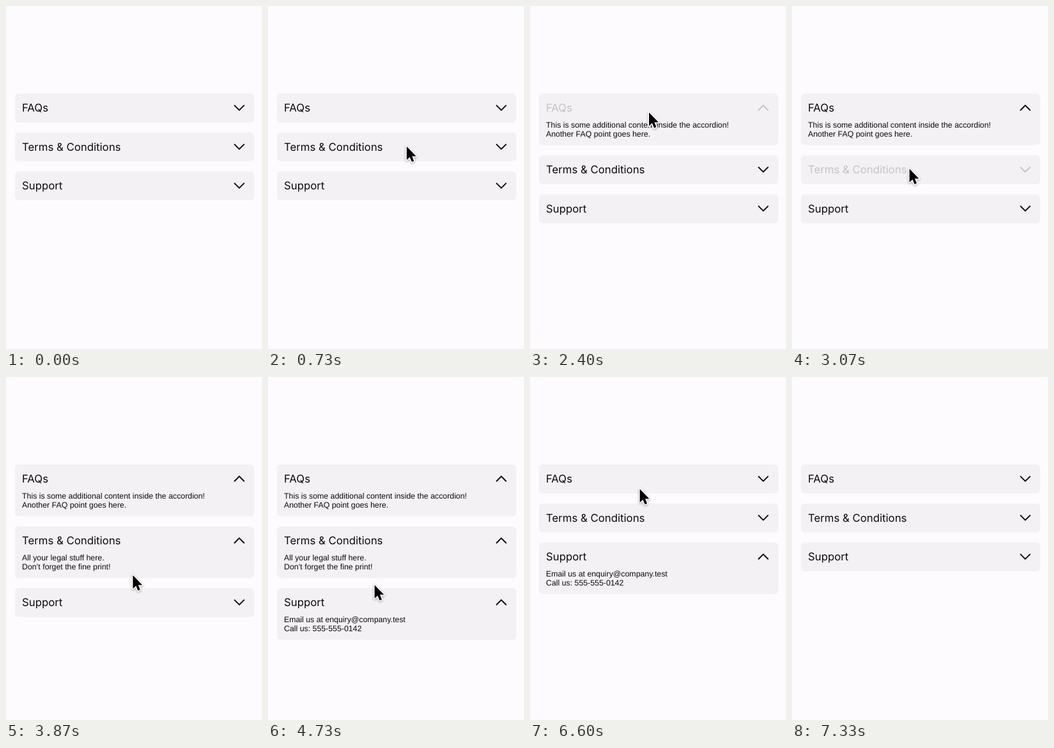
An HTML page that plays this animation: 400 by 533 pixels, repeating every 8070 ms.

```html
<!DOCTYPE html>
<html lang="en">
<head>
<meta charset="utf-8">
<title>Accordion</title>
<style>
  html, body { margin: 0; width: 100%; height: 100%; overflow: hidden; background: #fdfbfe; }
  svg { display: block; width: 100%; height: 100%; }
  text { text-rendering: geometricPrecision; fill: #0c0b0d; }
  .card { fill: #f3f1f4; }
  .title { font: 400 16.75px Inter, sans-serif; }
  .body { font: 400 12.33px "Liberation Sans", Arial, sans-serif; }
  .chevron { fill: none; stroke: #0c0b0d; stroke-width: 2; stroke-linecap: round; stroke-linejoin: round; }
  .cursor { fill: #000; stroke: #fff; stroke-width: 3.2; stroke-linejoin: round; paint-order: stroke;
            filter: drop-shadow(0 1.5px 1.5px rgba(0, 0, 0, .35)); }
</style>
</head>
<body>
<svg id="stage" viewBox="0 0 400 533"></svg>
<script>
const LOOP = 8070, STEP = 200 / 3, FADE = 250, DIM = 0.2, LEAD = 140;
const TOP = 136, CLOSED = 45, OPEN = 80.5, GAP = 15.5;
const SHOWN = 270, GONE = 7330, ENTRY = { x: 170, y: 432 };

const sections = [
  ["FAQs", "This is some additional content inside the accordion!", "Another FAQ point goes here."],
  ["Terms & Conditions", "All your legal stuff here.", "Don’t forget the fine print!"],
  ["Support", "Email us at enquiry@company.test", "Call us: 555-555-0142"]
];

// Each tap toggles a section; travel is the cursor's time on the way there.
const taps = [
  { section: 0, press: 1070, hold: 60, travel: 700 },
  { section: 0, press: 1730, hold: 140 },
  { section: 0, press: 2330, hold: 70 },
  { section: 1, press: 3070, hold: 130, travel: 330 },
  { section: 2, press: 4130, hold: 140, travel: 290 },
  { section: 1, press: 5270, hold: 200, travel: 560 },
  { section: 0, press: 6070, hold: 130, travel: 460 },
  { section: 2, press: 7070, hold: 10, travel: 400 }
];

const stage = document.getElementById("stage");
const ease = v => { const u = Math.min(1, Math.max(0, v)); return u * u * (3 - 2 * u); };

function add(parent, tag, attrs = {}, text = "") {
  const node = document.createElementNS("http://www.w3.org/2000/svg", tag);
  for (const key in attrs) node.setAttribute(key, attrs[key]);
  node.textContent = text;
  return parent.appendChild(node);
}

const cards = sections.map(([title, ...lines]) => {
  const root = add(stage, "g");
  const box = add(root, "rect", { class: "card", x: 14, width: 374, rx: 6 });
  const head = add(root, "g");
  add(head, "text", { class: "title", x: 25, y: 28.2 }, title);
  const chevron = add(head, "path", { class: "chevron" });
  const body = add(root, "g");
  lines.forEach((line, i) => add(body, "text", { class: "body", x: 25, y: 52.6 + 14 * i }, line));
  return { root, box, head, chevron, body };
});

const cursor = add(stage, "path", {
  class: "cursor",
  d: "M0 0V21L4.8 16.5L8 24L11.4 22.6L8.3 15.2H14.8Z"
});

function layout(t) {
  let y = TOP;
  return sections.map((_, i) => {
    const state = { y, open: false, opacity: 1 };
    for (const { section, press, hold } of taps) {
      if (section !== i || t < press) continue;
      const since = t - press - hold;
      if (since >= 0) state.open = !state.open;
      state.opacity = DIM + (1 - DIM) * ease(since / FADE);
    }
    state.height = state.open ? OPEN : CLOSED;
    y += state.height + GAP;
    return state;
  });
}

// The cursor bows right on its way down the list and left on its way back.
let from = ENTRY, last = -1;
const moves = taps.filter(tap => tap.travel).map(({ section, press, travel }) => {
  const side = section > last ? 1 : -1;
  const to = {
    x: side > 0 ? 186 - 2.5 * section : 164,
    y: layout(press)[section].y + 29.5 - 8.5 * section
  };
  const bend = {
    x: (from.x + to.x) / 2 + side * 0.4 * Math.abs(to.y - from.y),
    y: (from.y + to.y) / 2
  };
  const move = { start: press - LEAD - travel, travel, from, bend, to };
  from = to;
  last = section;
  return move;
});

function cursorAt(t) {
  const { start, travel, from, bend, to } = moves.filter(m => t >= m.start).pop() || moves[0];
  const p = ease((t - start) / travel), q = 1 - p;
  return ["x", "y"].map(k => q * q * from[k] + 2 * p * q * bend[k] + p * p * to[k]);
}

function draw(t) {
  layout(t).forEach(({ y, height, open, opacity }, i) => {
    const { root, box, head, chevron, body } = cards[i];
    root.setAttribute("transform", `translate(0 ${y})`);
    box.setAttribute("height", height);
    head.setAttribute("opacity", opacity);
    chevron.setAttribute("d", open ? "M357.2 25.7l7.3 -7.3l7.3 7.3" : "M357.2 18.6l7.3 7.3l7.3 -7.3");
    body.setAttribute("visibility", open ? "visible" : "hidden");
  });
  cursor.setAttribute("visibility", t >= SHOWN && t < GONE ? "visible" : "hidden");
  cursor.setAttribute("transform", `translate(${cursorAt(t)})`);
}

// Motion advances at 15 steps per second.
function tick() {
  const step = Math.floor((performance.now() % LOOP + 4) / STEP);
  draw(Math.round(step * STEP / 10) * 10 % LOOP);
  requestAnimationFrame(tick);
}
tick();
</script>
</body>
</html>
```
